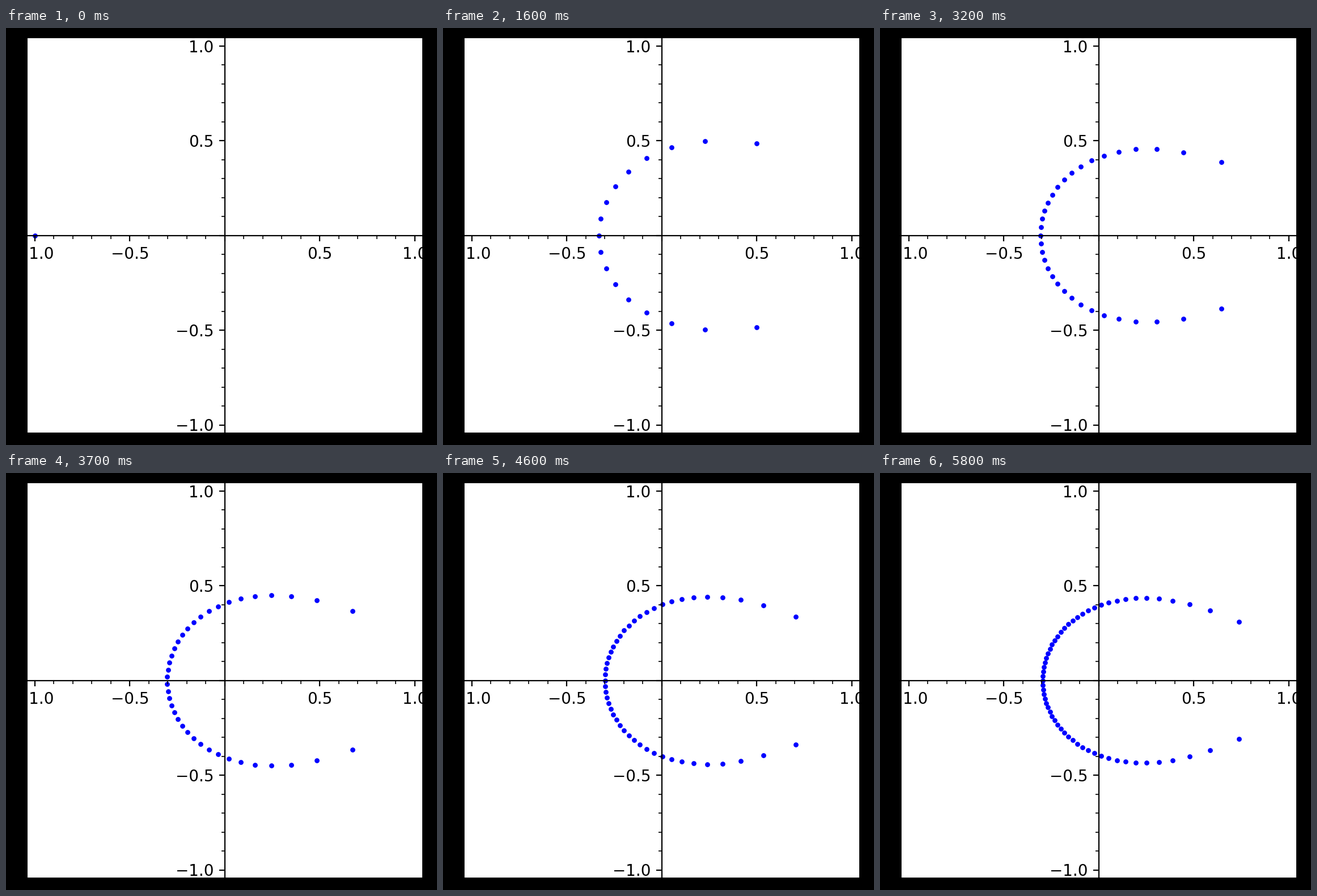
Write a matplotlib script that moves like this. It is 760 px wide and 737 px high and loops after 5900 ms.

```python
import math

import numpy as np
import matplotlib.pyplot as plt
from matplotlib.animation import FuncAnimation
from matplotlib.ticker import FixedLocator, FuncFormatter

W, H, DPI = 760, 737, 200
FRAMES, STEP_MS = 59, 100
CX, CY, UNIT, LIMIT = 385.8, 366.6, 334.9, 1.04

plt.rcParams["font.family"] = "DejaVu Sans"
plt.rcParams["font.size"] = 10


def exp_zeros(n):
    """Zeros of sum((n w)^k / k!, k = 0..n), the scaled partial sums of exp."""
    m = np.arange(1, (n + 1) // 2 + 1)

    # Start on the limit curve w * exp(1 - w) = exp(i * theta)
    phase = np.exp(2j * np.pi * m / (n + 1) - 1)
    w = np.zeros(len(m), complex)
    for _ in range(60):
        w = phase * np.exp(w)

    # Newton on log(exp(-z) * tail(z)) = 2 pi i m, which avoids cancellation
    z = n * w
    for _ in range(40):
        term = np.ones_like(z)
        tail = term.copy()
        for k in range(1, 160):
            term = term * z / (n + 1 + k)
            tail += term
        g = ((n + 1) * (np.log(-z) + 1j * np.pi) - math.lgamma(n + 2)
             - z + np.log(tail))
        z = z - (g - 2j * np.pi * m) * z * tail / (n + 1)

    w = z / n
    return np.concatenate([w, w[np.abs(w.imag) > 1e-9].conj()])


def tick_label(value, _):
    return "" if abs(value) < 1e-9 else f"{value:.1f}".replace("-", "\u2212")


fig = plt.figure(figsize=(W / DPI, H / DPI), dpi=DPI, facecolor="black")
half = UNIT * LIMIT
ax = fig.add_axes([(CX - half) / W, (H - CY - half) / H,
                   2 * half / W, 2 * half / H], facecolor="white")
ax.set(xlim=(-LIMIT, LIMIT), ylim=(-LIMIT, LIMIT))

for side in ("right", "top"):
    ax.spines[side].set_visible(False)
for side in ("left", "bottom"):
    ax.spines[side].set_position("zero")
    ax.spines[side].set_linewidth(0.8)

for axis in (ax.xaxis, ax.yaxis):
    axis.set_major_locator(FixedLocator(np.arange(-2, 3) / 2))
    axis.set_minor_locator(FixedLocator(np.arange(-10, 11) / 10))
    axis.set_major_formatter(FuncFormatter(tick_label))
ax.tick_params(which="major", length=3.5, width=0.8, pad=3.5)
ax.tick_params(which="minor", length=2, width=0.6)

dots = ax.scatter([], [], s=10, c="#0000ff", linewidths=0, zorder=1)
zeros = [exp_zeros(n) for n in range(1, FRAMES + 1)]


def update(i):
    w = zeros[i]
    dots.set_offsets(np.column_stack([w.real, w.imag]))
    return (dots,)


anim = FuncAnimation(fig, update, frames=FRAMES, interval=STEP_MS,
                     repeat=True, repeat_delay=0, blit=False)
plt.show()
```
